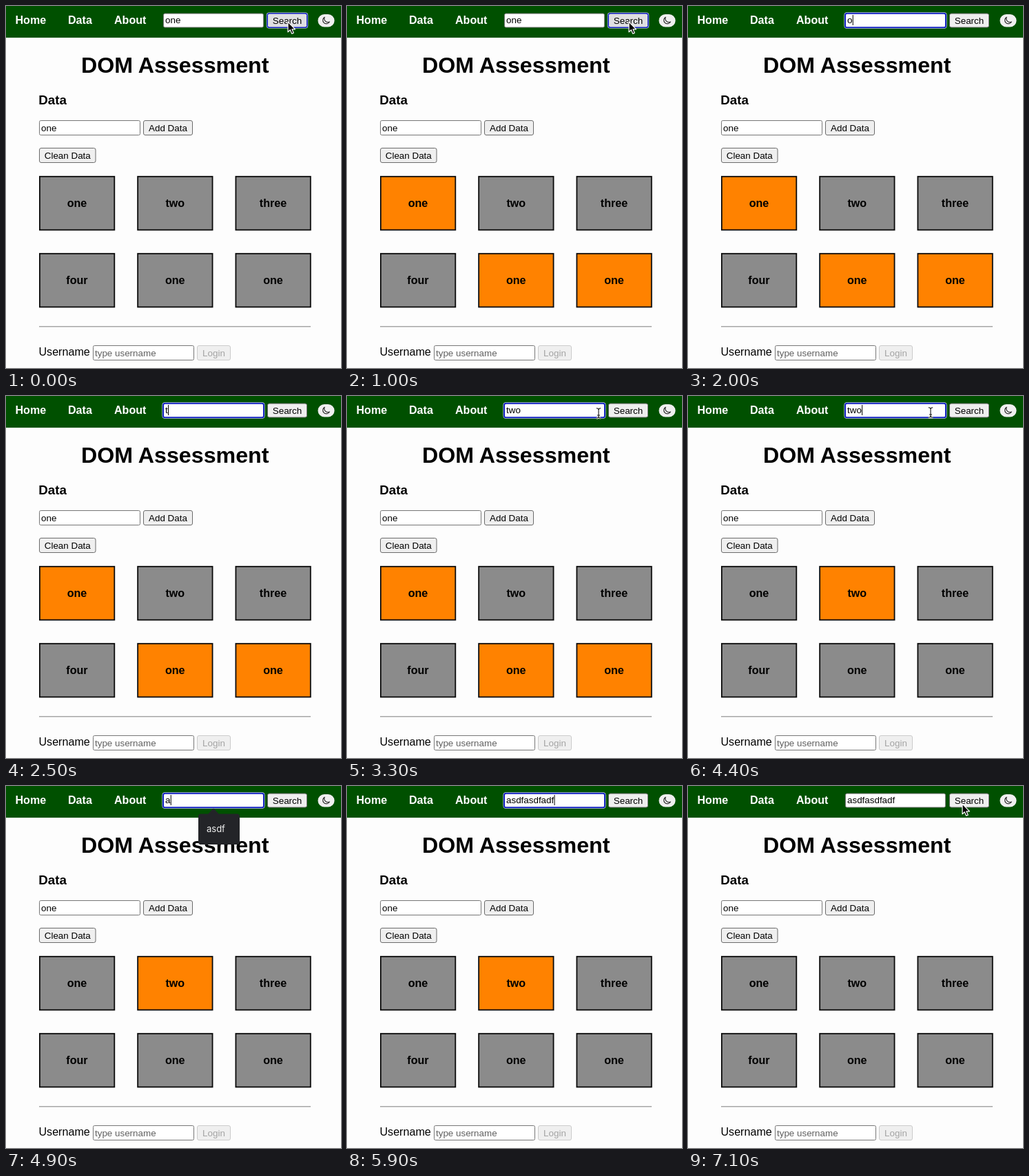
Animation, 486 px wide and 526 px high, one loop 7.2 s. Source, as an HTML page:

```html
<!DOCTYPE html>
<html lang="en">
<head>
<meta charset="utf-8">
<title>DOM Assessment</title>
<style>
  html, body { margin: 0; width: 100%; height: 100%; overflow: hidden; background: #fdfdfd; }
  svg { display: block; width: 486px; height: 526px; }
  text { font: 13.4px "Liberation Sans", Arial, sans-serif; }
  .bold { font-weight: bold; }
  .mid { text-anchor: middle; }
  .pop { font-family: Inter, Roboto, sans-serif; font-size: 13px; }
</style>
</head>
<body>
<svg id="stage" viewBox="0 0 486 526"></svg>
<script>
const LOOP = 7200, STEP = 100;
const GRAY = '#8b8b8b', ORANGE = '#ff8200', BLUE = '#101fc0';
const stage = document.getElementById('stage');

function add(tag, attrs, content = '', parent = stage) {
  const el = document.createElementNS('http://www.w3.org/2000/svg', tag);
  for (const key in attrs) el.setAttribute(key, attrs[key]);
  el.textContent = content;
  return parent.appendChild(el);
}
const group = () => add('g', {});
const rect = (x, y, width, height, attrs, parent) =>
  add('rect', { x, y, width, height, ...attrs }, '', parent);
const label = (str, x, y, cls = '', style = '', parent) =>
  add('text', { x, y, class: cls, style }, str, parent);

function field(x, y, w, h, parent) {
  return rect(x + .5, y + .5, w - 1, h - 1, { rx: 2, fill: '#fff', stroke: '#767676' }, parent);
}
function button(str, x, y, w, h, ink = '#000', edge = '#6b6b6b') {
  const face = rect(x + .5, y + .5, w - 1, h - 1, { rx: 2.5, fill: '#efefef', stroke: edge });
  label(str, x + w / 2, y + h / 2 + 4.5, 'mid', `fill:${ink}`);
  return face;
}
function focusRing(x, y, w, h) {
  const g = group();
  rect(x - 1.5, y - 1.5, w + 3, h + 3, { rx: 4, fill: '#fff' }, g);
  rect(x, y, w, h, { rx: 2.5, fill: 'none', stroke: BLUE, 'stroke-width': 2 }, g);
  return g;
}
const show = (el, on) => el.setAttribute('visibility', on ? 'visible' : 'hidden');

// Page
rect(0, 0, 486, 526, { fill: '#fdfdfd' });
rect(0, 0, 486, 46, { fill: '#005000' });
[['Home', 13.5], ['Data', 90], ['About', 157]].forEach(([str, x]) =>
  label(str, x, 26.3, 'bold', 'fill:#fff;font-size:16.1px'));

field(228, 10.5, 146, 21);
const fieldRing = focusRing(228, 10.8, 146, 20.4);
const query = label('', 231, 25.3);
const caret = rect(0, 13, 1, 15, { fill: '#000' });
const buttonRing = focusRing(379.3, 10.9, 57.4, 20.2);
const searchFace = button('Search', 379, 10.5, 58, 21);

rect(452.5, 12, 24, 18.5, { rx: 9.2, fill: '#efefef' });
add('path', {
  d: 'M462.2 16.2a5.1 5.1 0 1 0 7.1 6.7a5.2 5.2 0 0 1-7.1-6.7z',
  fill: 'none', stroke: '#222', 'stroke-width': 1.1, 'stroke-linejoin': 'round'
});

label('DOM Assessment', 245.2, 97.3, 'bold mid', 'font-size:32.2px');
label('Data', 47.3, 143.3, 'bold', 'font-size:18.8px');
field(48, 166, 147, 22);
label('one', 51, 181.6);
button('Add Data', 199, 166, 72, 22);
button('Clean Data', 48, 206, 82.5, 22);

const cards = ['one', 'two', 'three', 'four', 'one', 'one'].map((word, i) => {
  const x = 48 + (i % 3) * 142.25, y = 247 + Math.floor(i / 3) * 112;
  const face = rect(x + .9, y + .8, 108.4, 77.6, { stroke: '#0a0a0a', 'stroke-width': 1.8 });
  label(word, x + 55, y + 45, 'bold mid', 'font-size:16.1px');
  return { word, face };
});

rect(48, 465, 394, 1.5, { fill: '#a6a6a6' });
label('Username', 47.5, 508.3, '', 'font-size:16.1px');
field(126, 493, 147, 22);
label('type username', 129, 508.6, '', 'fill:#606060');
button('Login', 277, 493, 49, 22, '#a4a4a4', '#cccccc');

// Suggestion bubble
const bubble = group();
add('path', { d: 'M292.5 41.5L301 32.5L309.5 41.5z', fill: '#232428' }, '', bubble);
rect(279, 40.5, 60, 44.5, { rx: 4, fill: '#232428' }, bubble);
label('asdf', 291, 67, 'pop', 'fill:#f0f0f0', bubble);

// Pointers, both with their hot spot at 0,0
const arrow = add('path', {
  d: 'M0 0V14.8L3.3 11.7L5.7 17.2L8.2 16.1L5.9 10.8H10.5z',
  fill: '#000', stroke: '#fff', 'stroke-width': 1.2, 'stroke-linejoin': 'round'
});
const beam = group();
for (const [stroke, width] of [['#fff', 2.6], ['#111', 1.1]])
  add('path', {
    d: 'M-3.2-7.2Q0-7.2 0-4.8Q0-7.2 3.2-7.2M0-5V5M-3.2 7.2Q0 7.2 0 4.8Q0 7.2 3.2 7.2M-2 3H2',
    fill: 'none', stroke, 'stroke-width': width
  }, '', beam);

// Time tables: [start, value]
const typed = [
  [0, 'one'], [1800, 'on'], [2000, 'o'], [2200, ''], [2400, 't'], [2600, 'tw'], [2800, 'two'],
  [4500, 'tw'], [4600, 't'], [4700, ''], [4800, 'a'], [5000, 'as'], [5100, 'asd'], [5200, 'asdf'],
  [5300, 'asdfa'], [5400, 'asdfas'], [5500, 'asdfasd'], [5600, 'asdfasdf'],
  [5700, 'asdfasdfa'], [5800, 'asdfasdfad'], [5900, 'asdfasdfadf']
];
const searched = [[0, ''], [500, 'one'], [3600, 'two'], [6300, 'asdfasdfadf']];
const focus = [
  [0, 'button'], [1500, 'field'], [3600, ''], [4400, 'field'], [6300, '']
];
const pointerOn = [[0, true], [1800, false], [3100, true], [4500, false], [6000, true]];
const caretOn = [[0, true], [3200, false], [4400, true], [6100, false]];
const path = [
  [0, 409, 23], [1100, 409, 23], [1400, 352, 24], [3100, 352, 24], [3300, 365, 25],
  [3500, 397, 20], [4000, 397, 20], [4300, 352, 24], [6000, 352, 24],
  [6200, 397, 22], [6400, 398, 26], [7200, 398, 26]
];

const valueAt = (table, t) => table.findLast(row => row[0] <= t)[1];

function pointAt(t) {
  const i = path.findIndex(row => row[0] > t);
  const [t0, x0, y0] = path[i - 1], [t1, x1, y1] = path[i];
  const k = (t - t0) / (t1 - t0);
  return [x0 + (x1 - x0) * k, y0 + (y1 - y0) * k];
}

function draw(t) {
  const focused = valueAt(focus, t);
  const term = valueAt(searched, t);
  const [x, y] = pointAt(t);
  const visible = valueAt(pointerOn, t);
  const overField = x < 375;

  query.textContent = valueAt(typed, t);
  show(fieldRing, focused === 'field');
  show(buttonRing, focused === 'button');
  searchFace.setAttribute('stroke', focused === 'button' ? BLUE : '#6b6b6b');
  searchFace.setAttribute('fill', x > 379 && t < 6400 ? '#dfdfe2' : '#efefef');
  caret.setAttribute('x', 231.3 + query.getComputedTextLength());
  show(caret, focused === 'field' && valueAt(caretOn, t));
  show(bubble, t >= 4800 && t < 5300);
  for (const { word, face } of cards) face.setAttribute('fill', word === term ? ORANGE : GRAY);

  const place = `translate(${x} ${y})`;
  arrow.setAttribute('transform', place);
  beam.setAttribute('transform', place);
  show(arrow, visible && !overField);
  show(beam, visible && overField);
}

const start = performance.now();
function tick() {
  const t = (performance.now() - start) % LOOP;
  draw(Math.floor(t / STEP) * STEP);
  requestAnimationFrame(tick);
}
tick();
</script>
</body>
</html>
```
